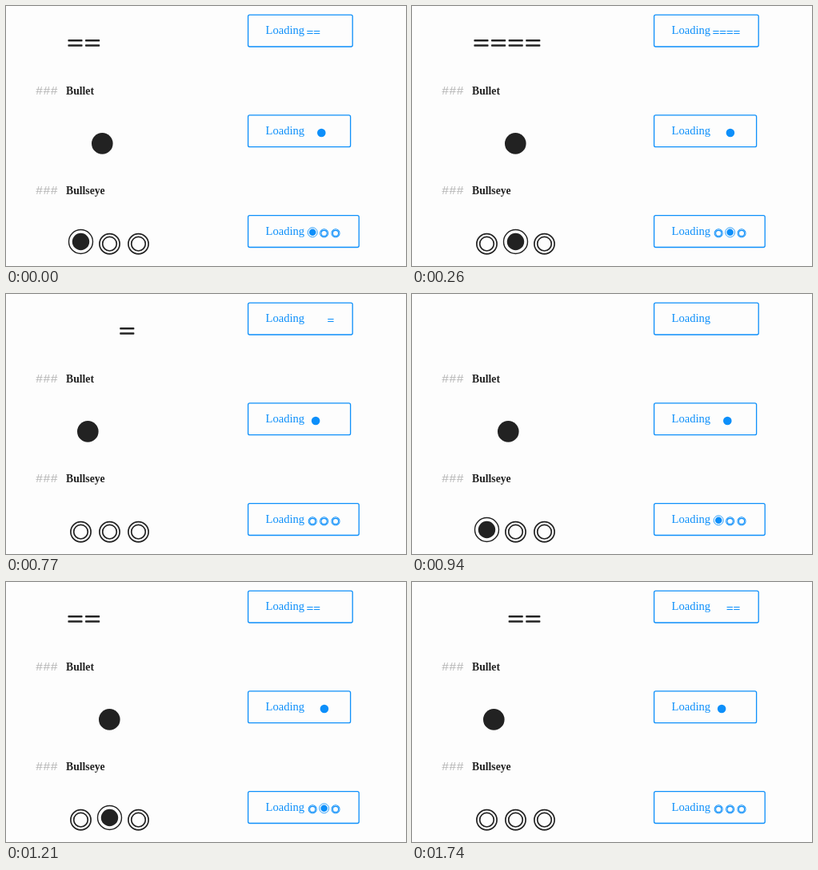
Animation, 500 px wide and 326 px high, one loop 1790 ms. Source, as an HTML page with a canvas:

```html
<!DOCTYPE html>
<html lang="en">
<head>
<meta charset="utf-8">
<title>Text spinners</title>
<style>
  html, body { margin: 0; width: 100%; height: 100%; overflow: hidden; background: #fdfdfd; }
  canvas { display: block; }
</style>
</head>
<body>
<canvas id="stage" width="500" height="326"></canvas>
<script>
const ctx = document.getElementById('stage').getContext('2d');
const INK = '#222', BLUE = '#0d8ffa', GREY = '#b4b4b4', PAPER = '#fdfdfd';
const SERIF = '"Liberation Serif", serif';
const LOOP = 1790;

// The picture only changes at these times (ms).
const TICKS = [0, 90, 170, 260, 340, 430, 510, 600, 690, 770, 860,
               940, 1030, 1120, 1210, 1300, 1390, 1470, 1560, 1650, 1740];

// Step of a cyclic spinner: start phase in steps, step length in ms.
const step = (t, phase, length, count) => Math.floor(phase + t / length) % count;

function label(text, x, y, font, color) {
  ctx.font = font;
  ctx.fillStyle = color;
  ctx.fillText(text, x, y);
}

function disc(x, y, r) {
  ctx.beginPath();
  ctx.arc(x, y, r, 0, 2 * Math.PI);
  ctx.fill();
}

function ring(x, y, r, width) {
  ctx.lineWidth = width;
  ctx.beginPath();
  ctx.arc(x, y, r, 0, 2 * Math.PI);
  ctx.stroke();
}

function heading(text, y) {
  label('###', 37, y, '15.5px "Liberation Mono", monospace', GREY);
  label(text, 75, y, `bold 13.7px ${SERIF}`, INK);
}

function button(y, width) {
  ctx.strokeStyle = BLUE;
  ctx.lineWidth = 1.3;
  ctx.beginPath();
  ctx.roundRect(302.6, y, width, 39.8, 2);
  ctx.stroke();
  label('Loading', 324.5, y + 24, `14.6px ${SERIF}`, BLUE);
}

// Bars fill from the left, then empty from the left.
function equals(n, x, y, pitch, width, gap, weight) {
  for (let i = Math.max(0, n - 4); i < Math.min(n, 4); i++) {
    for (const side of [-1, 1]) {
      ctx.beginPath();
      ctx.roundRect(x + i * pitch, y + side * gap - weight / 2, width, weight, weight / 3);
      ctx.fill();
    }
  }
}

// One of three targets is active; active = -1 leaves all idle.
function bullseyes(active, x, y, k, thin) {
  for (let i = 0; i < 3; i++) {
    const cx = x + i * 36 * k;
    if (i === active) {
      const cy = y - 2.7 * k;
      ring(cx, cy, 15 * k, 1.4 * thin);
      disc(cx, cy, 10.7 * k);
    } else {
      ring(cx, y, 12.6 * k, 1.7 * thin);
      ring(cx, y, 8.8 * k, 1.7 * thin);
    }
  }
}

function ink(color) {
  ctx.fillStyle = ctx.strokeStyle = color;
}

function draw(t) {
  ctx.fillStyle = PAPER;
  ctx.fillRect(0, 0, 500, 326);

  heading('Bullet', 110.7);
  heading('Bullseye', 236.3);
  button(11.2, 130.6);
  button(136.9, 128);
  button(262.7, 138.6);

  const bars = step(t, 2.57, 147, 8);
  const hop = step(t, 3.78, 96, 10);
  const spaces = Math.min(hop, 10 - hop);
  const active = step(t, 1.5, 240, 4) - 1;

  ink(INK);
  equals(bars, 77.4, 46.4, 21.6, 18.2, 3.1, 2.4);
  disc(93.3 + 9 * spaces, 172.4, 13.3);
  bullseyes(active, 93.5, 298.2, 1, 1);

  ink(BLUE);
  equals(bars, 376.2, 33, 8.65, 7.5, 1.5, 1.2);
  disc(383.5 + 3.6 * spaces, 159, 5.3);
  bullseyes(active, 383.2, 284.9, 0.4, 0.6);
}

function frame() {
  const t = performance.now() % LOOP;
  draw(TICKS.findLast(tick => tick <= t));
  requestAnimationFrame(frame);
}
frame();
</script>
</body>
</html>
```
